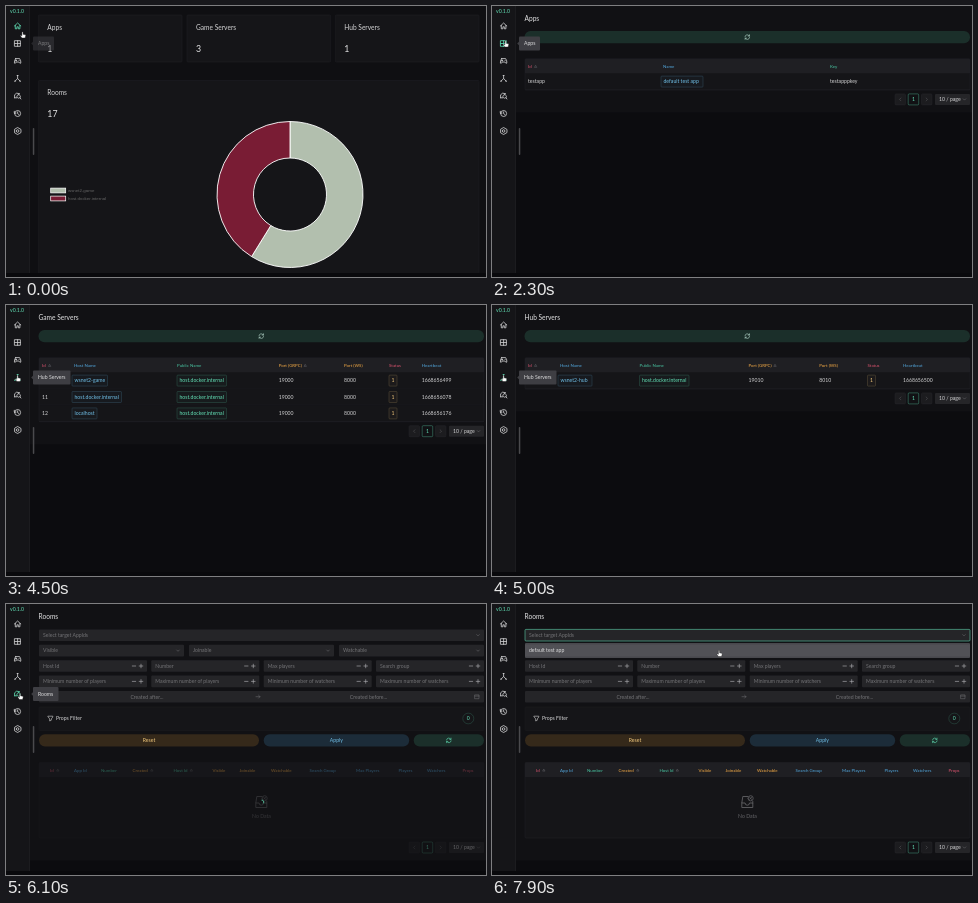
Animation, 480 px wide and 271 px high, one loop 8000 ms. Source, as an HTML page:

```html
<!DOCTYPE html>
<html lang="en">
<head>
<meta charset="utf-8">
<title>Dashboard tour</title>
<style>
  html, body { margin: 0; width: 100%; height: 100%; overflow: hidden; background: #0c0c0f; }
  svg { display: block; width: 100vw; height: 100vh; }
  text { font-family: Lato, "Open Sans", sans-serif; white-space: pre; }
  .legend text { font-family: "Liberation Sans", Arial, sans-serif; }
</style>
</head>
<body>
<svg id="stage" viewBox="0 0 480 271"></svg>
<script>
const LOOP = 8000, STEP = 100;
const BODY = 5.13, SMALL = 4.4, TITLE = 6.6, BIG = 8.8;
const C = {
  text: '#d5d5d6', dim: '#737376', field: '#252528', line: '#252529',
  blue: '#4f9fd2', green: '#46bb9a', orange: '#e8a344', red: '#d0506a',
  tagBlue: '#70c0e8', tagGreen: '#63e2b7', tagOrange: '#f2c97d'
};

// Drawing helpers; text is placed by its vertical centre.
const rect = (x, y, w, h, fill, r = 1, extra = '') =>
  `<rect x="${x}" y="${y}" width="${w}" height="${h}" rx="${r}" fill="${fill}" ${extra}/>`;
const border = (color, alpha = 1, width = .4) =>
  `stroke="${color}" stroke-opacity="${alpha}" stroke-width="${width}"`;
const text = (x, y, str, fill = C.text, size = BODY, extra = '') =>
  `<text x="${x}" y="${y + size * .36}" font-size="${size}" fill="${fill}" ${extra}>${str}</text>`;
const centred = (x, y, str, fill, size) => text(x, y, str, fill, size, 'text-anchor="middle"');
const icon = (x, y, d, color = C.text, width = .7, extra = '') =>
  `<path transform="translate(${x} ${y})" d="${d}" fill="none" stroke="${color}" stroke-width="${width}" stroke-linecap="round" stroke-linejoin="round" ${extra}/>`;
const group = (content, attrs = '') => `<g ${attrs}>${content}</g>`;

const circle = r => `M${-r} 0a${r} ${r} 0 1 0 ${2 * r} 0a${r} ${r} 0 1 0 ${-2 * r} 0`;
const CHEVRON = 'M-1.3 -.6L0 .7L1.3 -.6';
const RELOAD = 'M-2.3 -.4A2.3 2.3 0 0 1 2 -1.1M2.3 .4A2.3 2.3 0 0 1 -2 1.1M2.2 -2.3V-1H.9M-2.2 2.3V1H-.9';
const SORT = 'M-1 .9H1L0 -.9Z';

const chevron = (x, y) => icon(x, y, CHEVRON, C.dim, .5);
const reload = (x, y, color) => icon(x, y, RELOAD, color, .6);
const title = str => text(32.5, 12.5, str, '#e4e4e5', TITLE);

function tag(x, y, w, str, color) {
  return rect(x, y - 5.5, w, 11, color, .8, `fill-opacity=".03" ${border(color, .4)}`) +
    text(x + 2.5, y, str, color);
}

function pager(y) {
  const button = x => rect(x, y - 5.5, 10.5, 11, '#1c1c1f', 1, border('#2c2c30'));
  return button(403) + icon(408.2, y, 'M.7 -1.4L-.7 0L.7 1.4', '#5c5c60', .5) +
    rect(416.2, y - 5.5, 10.5, 11, 'none', 1, border(C.tagGreen, .8)) +
    centred(421.5, y, '1', C.tagGreen) +
    button(429.5) + icon(434.8, y, 'M-.7 -1.4L.7 0L-.7 1.4', '#5c5c60', .5) +
    rect(443, y - 5.5, 35, 11, C.field) + text(447, y, '10 / page') + chevron(472.5, y);
}

// Headers are [x, label, colour, sortX]; a sortX adds the sort mark.
function header(y, columns) {
  return rect(33, y - 7.5, 445, 15, '#1f1f23') + columns.map(([x, label, color, sortX]) =>
    text(x, y, label, C[color], SMALL, 'font-weight="500"') +
    (sortX ? icon(sortX, y + .2, SORT, C.dim, .4) : '')).join('');
}

// Cells are plain strings or [label, tagWidth, colour].
function listPage(name, columns, rows) {
  const bottom = 67.5 + rows.length * 16.4;
  const cells = rows.map((row, r) => {
    const y = 75.6 + r * 16.4;
    return rect(33, y - 8.2, 445, 16.4, '#151518', 0) +
      `<path d="M33 ${y + 8.2}H478" stroke="${C.line}" stroke-width=".4"/>` +
      row.map((cell, i) => Array.isArray(cell)
        ? tag(columns[i][0] - (i === 1 ? 2 : 0), y, cell[1], cell[0], cell[2])
        : text(columns[i][0], y, cell)).join('');
  }).join('');
  const table = header(60.3, columns) + cells +
    rect(33, 52.8, 445, bottom - 52.8, 'none', 1, border(C.line)) + pager(bottom + 9.5);
  return rect(24, 0, 456, bottom + 22.5, '#111114', 0) + title(name) +
    rect(32.5, 25, 445.5, 12.3, '#1b2f2a', 6) + reload(255.3, 31.1, '#b7d8cd') +
    group(table, 'class="table"') +
    group(icon(0, 0, 'M1.8 0A1.8 1.8 0 0 1 -1 1.5', C.tagGreen, .8), 'class="spinner" data-y="96"');
}

function serverColumns(x) {
  return [[36, 'Id', 'red', 43.8], [68, 'Host Name', 'blue'], [x[0], 'Public Name', 'green'],
    [x[1], 'Port (GRPC)', 'orange', x[1] + 26.7], [x[2], 'Port (WS)', 'orange'],
    [x[3], 'Status', 'red'], [x[4], 'Heartbeat', 'blue']];
}
const serverRow = (id, host, width, port, ws, beat) => [id, [host, width, C.tagBlue],
  ['host.docker.internal', 49.5, C.tagGreen], port, ws, ['1', 8, C.tagOrange], beat];

function homePage() {
  const card = (x, y, w, h, label, value) => rect(x, y, w, h, '#151518', 1, border(C.line)) +
    text(x + 9, y + 12.3, label, C.text, TITLE) + text(x + 9, y + 33.5, value, '#e4e4e5', BIG);
  const cx = 284, cy = 188.5, outer = 73, inner = 36.5;
  const point = (r, a) => `${cx + r * Math.sin(a)} ${cy - r * Math.cos(a)}`;
  const slice = (from, to, fill) => {
    const a = from * 2 * Math.PI, b = to * 2 * Math.PI, large = to - from > .5 ? 1 : 0;
    return `<path d="M${point(outer, a)}A${outer} ${outer} 0 ${large} 1 ${point(outer, b)}L${point(inner, b)}A${inner} ${inner} 0 ${large} 0 ${point(inner, a)}Z" fill="${fill}" stroke="#fff" stroke-width=".9"/>`;
  };
  const legend = (y, label, fill) =>
    rect(44.7, y - 2.4, 15, 4.8, fill, 0, border('#fff', 1, .7)) + text(62, y, label, '#666', SMALL);
  const pale = '#b2bfae', wine = '#791c34';
  return rect(24, 0, 456, 267, '#0f0f12', 0) +
    card(32.3, 9, 143.7, 47, 'Apps', '1') + card(181, 9, 143.7, 47, 'Game Servers', '3') +
    card(329.3, 9, 143.7, 47, 'Hub Servers', '1') + card(32.3, 74.5, 440.7, 193, 'Rooms', '17') +
    slice(0, 10 / 17, pale) + slice(10 / 17, 1, wine) +
    group(legend(184.5, 'wsnet2-game', pale) + legend(192.5, 'host.docker.internal', wine), 'class="legend"');
}

function roomsPage() {
  const field = (x, y, w, label) => rect(x, y - 5.8, w, 11.6, C.field) + text(x + 4, y, label, C.dim);
  const select = (x, y, w, label) => field(x, y, w, label) + chevron(x + w - 6, y);
  const number = (x, y, label) => field(x, y, 108, label) +
    icon(x + 95, y, 'M-1.7 0H1.7', '#b8b8ba', .6) + icon(x + 102, y, 'M-1.8 0H1.8M0 -1.8V1.8', '#b8b8ba', .6);
  const xs = [33, 145.3, 257.7, 370];
  const numbers = (y, labels) => labels.map((label, i) => number(xs[i], y, label)).join('');
  const pill = (x, w, fill) => rect(x, 130.3, w, 12.3, fill, 6);
  const table = header(166, [
    [44, 'Id', 'red', 52], [68, 'App Id', 'blue'], [95, 'Number', 'green'], [126.5, 'Created', 'orange', 146],
    [167.5, 'Host Id', 'green', 185.5], [206.5, 'Visible', 'orange'], [233.5, 'Joinable', 'orange'],
    [265, 'Watchable', 'orange'], [303.5, 'Search Group', 'blue'], [350, 'Max Players', 'blue'],
    [392.5, 'Players', 'blue'], [421, 'Watchers', 'blue'], [456.5, 'Props', 'red']]) +
    rect(33, 173.5, 445, 60.5, '#151518', 0) + rect(33, 158.5, 445, 75.5, 'none', 1, border(C.line)) +
    icon(255.3, 198, 'M-5.5 1V5.5H5.5V1H2.2A2.2 2.2 0 0 1 -2.2 1H-5.5L-4.5 -5.5H.5M5.5 1V-.5', '#606064', .9) +
    icon(258.6, 194.3, circle(2.6) + 'M-1 -1L1 1M1 -1L-1 1', '#606064', .8) +
    centred(255.5, 212, 'No Data', '#646468') + pager(243.5);
  return rect(24, 0, 456, 256.5, '#111114', 0) + title('Rooms') +
    select(33, 31.2, 445, 'Select target AppIds') +
    select(33, 46.6, 145, 'Visible') + select(183, 46.6, 145, 'Joinable') + select(333, 46.6, 145, 'Watchable') +
    numbers(62, ['Host Id', 'Number', 'Max players', 'Search group']) +
    numbers(77.4, ['Minimum number of players', 'Maximum number of players',
      'Minimum number of watchers', 'Maximum number of watchers']) +
    field(33, 92.7, 445, '') + centred(141, 92.7, 'Created after...', C.dim) +
    icon(252, 92.7, 'M-2 0H2M.6 -1.4L2 0L.6 1.4', C.dim, .5) + centred(362.5, 92.7, 'Created before...', C.dim) +
    icon(471, 92.7, 'M-2 -1.8H2V2H-2ZM-2 -.6H2', C.dim, .5) +
    rect(33, 103, 445, 23.5, '#151518', 1, border('#1f1f23')) +
    icon(44.5, 114.5, 'M-2.3 -2.3H2.3V-1.5L.8 .4V1.7L-.8 2.5V.4L-2.3 -1.5Z', C.text, .6) +
    text(50, 114.5, 'Props Filter') +
    rect(456.8, 109.2, 11, 10.6, 'none', 5.3, border(C.tagGreen, .4)) + centred(462.3, 114.5, '0', C.tagGreen) +
    pill(33, 220, '#35291a') + centred(143, 136.4, 'Reset', C.tagOrange) +
    pill(257.7, 145.5, '#1c2c39') + centred(330.4, 136.4, 'Apply', C.tagBlue) +
    pill(407.7, 70.3, '#1b2f2a') + reload(442.8, 136.4, C.tagGreen) +
    group(table, 'class="table"') +
    group(icon(0, 0, 'M1.8 0A1.8 1.8 0 0 1 -1 1.5', C.tagGreen, .8), 'class="spinner" data-y="198"') +
    group(rect(33, 25.4, 445, 11.6, 'none', 1, border(C.tagGreen, .9, .6)) +
      rect(33, 39, 445, 15, '#48484d', 1) + rect(33, 40.5, 445, 12, '#515156', 0) +
      text(37, 46.6, 'default test app', '#dededf'), 'id="dropdown"');
}

const pages = [
  { from: 0, html: homePage() },
  { from: 1800, ready: 2200, html: listPage('Apps',
    [[36, 'Id', 'red', 43.8], [171, 'Name', 'blue'], [338, 'Key', 'green']],
    [['testapp', 'default test app', 'testapppkey']].map(([id, name, key]) => [id, [name, 42, C.tagBlue], key])) },
  { from: 3100, ready: 3600, html: listPage('Game Servers', serverColumns([171, 272.7, 338, 383, 415.7]), [
    serverRow('1', 'wsnet2-game', 35.5, '19000', '8000', '1668656499'),
    serverRow('11', 'host.docker.internal', 49.5, '19000', '8000', '1668656078'),
    serverRow('12', 'localhost', 25, '19000', '8000', '1668656176')]) },
  { from: 4700, ready: 5000, html: listPage('Hub Servers', serverColumns([147.5, 256.5, 327.3, 375.5, 411]), [
    serverRow('1', 'wsnet2-hub', 34, '19010', '8010', '1668656500')]) },
  { from: 5900, ready: 6300, html: roomsPage() }
];

const gear = Array.from({ length: 6 }, (_, i) => {
  const a = i * Math.PI / 3 + Math.PI / 6;
  return `${i ? 'L' : 'M'}${3.5 * Math.cos(a)} ${3.5 * Math.sin(a)}`;
}).join('') + 'Z' + circle(1.3);
const menu = [
  'M-3.2 0L0 -3L3.2 0M-2.3 -.6V2.8H-.7V.8H.7V2.8H2.3V-.6',
  'M-2.8 -2.8H2.8V2.8H-2.8ZM0 -2.8V2.8M-2.8 0H2.8',
  'M-2 -2.4H2Q3.6 -.2 3.2 2.1Q2.4 3 1.2 1H-1.2Q-2.4 3 -3.2 2.1Q-3.6 -.2 -2 -2.4ZM-1.5 -1V.2M-2.1 -.4H-.9M1.5 -.5V-.3',
  'M0 -3.1V0L-2.5 2.6M0 0L2.5 2.6M-.5 -3H.5M-3 2.6H-2M2 2.6H3',
  'M-3 1.8V-1.2L-1 -2.8L2 -2.3M-3 1.8H-.8M1 -1.4a1.8 1.8 0 1 0 .1 0M2.3 1.7L3.3 3',
  circle(3) + 'M-3.3 -2.2V-.4H-1.6M0 -1.6V.2L1.3 1',
  gear
];
const menuY = i => 20 + i * 17.5;
const tips = [
  { item: 1, label: 'Apps', width: 21, from: -90, to: 2600 },
  { item: 2, label: 'Game Servers', width: 41.3, from: 2700, to: 3900 },
  { item: 3, label: 'Hub Servers', width: 37.5, from: 4000, to: 5100 },
  { item: 4, label: 'Rooms', width: 25.5, from: 5350, to: 6500 }
];
const cursorPath = [
  [0, 16.5, 26], [100, 16.5, 26], [400, 13.5, 35], [2500, 13.5, 35], [2800, 11.5, 54], [3800, 11.5, 54],
  [4100, 11.5, 70.5], [5000, 11.5, 70.5], [5400, 14, 89.5], [6400, 14, 89.5], [6900, 297.5, 125],
  [7000, 297.5, 125], [7300, 228, 32], [7500, 228, 32], [7800, 227, 46.5], [8000, 227, 46.5]
];

const stage = document.getElementById('stage');
stage.innerHTML = rect(0, 0, 480, 271, '#0c0c0f', 0) +
  pages.map(p => group(p.html, 'class="page"')).join('') +
  rect(0, 0, 23.6, 267, '#151518', 0) + rect(23.4, 0, .5, 267, '#29292c', 0) +
  rect(0, 267, 480, 4, '#09090c', 0) +
  text(4, 5, 'v0.1.0', C.tagGreen) +
  menu.map((d, i) => icon(11.6, menuY(i), d, C.text, .8, 'class="item"')).join('') +
  rect(26.8, 122, 1.5, 27, '#4a4a4d', .7) +
  tips.map(t => group(
    `<path d="M27.2 -2L25.2 0L27.2 2Z" fill="#3e3e43"/>` + rect(27, -7, t.width, 14, '#3e3e43', 1) +
    text(32, 0, t.label, '#dededf'), `class="tip" transform="translate(0 ${menuY(t.item)})"`)).join('') +
  group('<path id="arrow" d="M0 0V6L1.4 4.7L2.3 6.7L3.3 6.2L2.4 4.3H4.3Z" fill="#111" stroke="#fff" stroke-width=".6"/>' +
    '<path id="hand" d="M-.6 .2Q0 -.6 .6 .2V2.3L2.8 2.8Q3.3 3 3.2 3.8L2.6 6H-.6L-2.2 3.8Q-2 2.9 -.6 3.8Z" fill="#fff" stroke="#111" stroke-width=".4"/>', 'id="cursor"');

const all = selector => [...stage.querySelectorAll(selector)];
const pageNodes = all('.page'), itemNodes = all('.item'), tipNodes = all('.tip');
const [dropdown, cursor, arrow, hand] =
  ['dropdown', 'cursor', 'arrow', 'hand'].map(id => document.getElementById(id));
const clamp = v => Math.max(0, Math.min(1, v));
const show = (node, visible) => node.setAttribute('display', visible ? 'inline' : 'none');

function cursorAt(t) {
  const i = cursorPath.findIndex(k => k[0] > t);
  const [t0, x0, y0] = cursorPath[i - 1], [t1, x1, y1] = cursorPath[i];
  const p = (t - t0) / (t1 - t0), ease = p * p * (3 - 2 * p);
  return [x0 + (x1 - x0) * ease, y0 + (y1 - y0) * ease];
}

function draw(t) {
  const current = pages.findLastIndex(p => p.from <= t);
  pageNodes.forEach((node, i) => show(node, i === current));
  const { ready } = pages[current];
  if (ready) {
    const node = pageNodes[current], spinner = node.querySelector('.spinner');
    node.querySelector('.table').setAttribute('opacity', t < ready ? .42 : 1);
    show(spinner, t < ready);
    spinner.setAttribute('transform', `translate(256 ${spinner.dataset.y}) rotate(${(t - 3300) * .225})`);
  }
  show(dropdown, t >= 7400);

  tipNodes.forEach((node, i) => node.setAttribute('opacity',
    Math.min(clamp((t - tips[i].from) / 180), clamp(1 - (t - tips[i].to) / 150))));

  const [x, y] = cursorAt(t);
  const hovered = x < 24 ? Math.round((y + 2 - 20) / 17.5) : -1;
  itemNodes.forEach((node, i) => node.setAttribute('stroke', i === hovered ? C.tagGreen : C.text));
  cursor.setAttribute('transform', `translate(${x} ${y})`);
  const pointing = x < 24 || t >= 7600;
  show(hand, pointing);
  show(arrow, !pointing);
}

function tick() {
  draw(Math.floor(performance.now() % LOOP / STEP) * STEP);
  requestAnimationFrame(tick);
}
tick();
</script>
</body>
</html>
```
